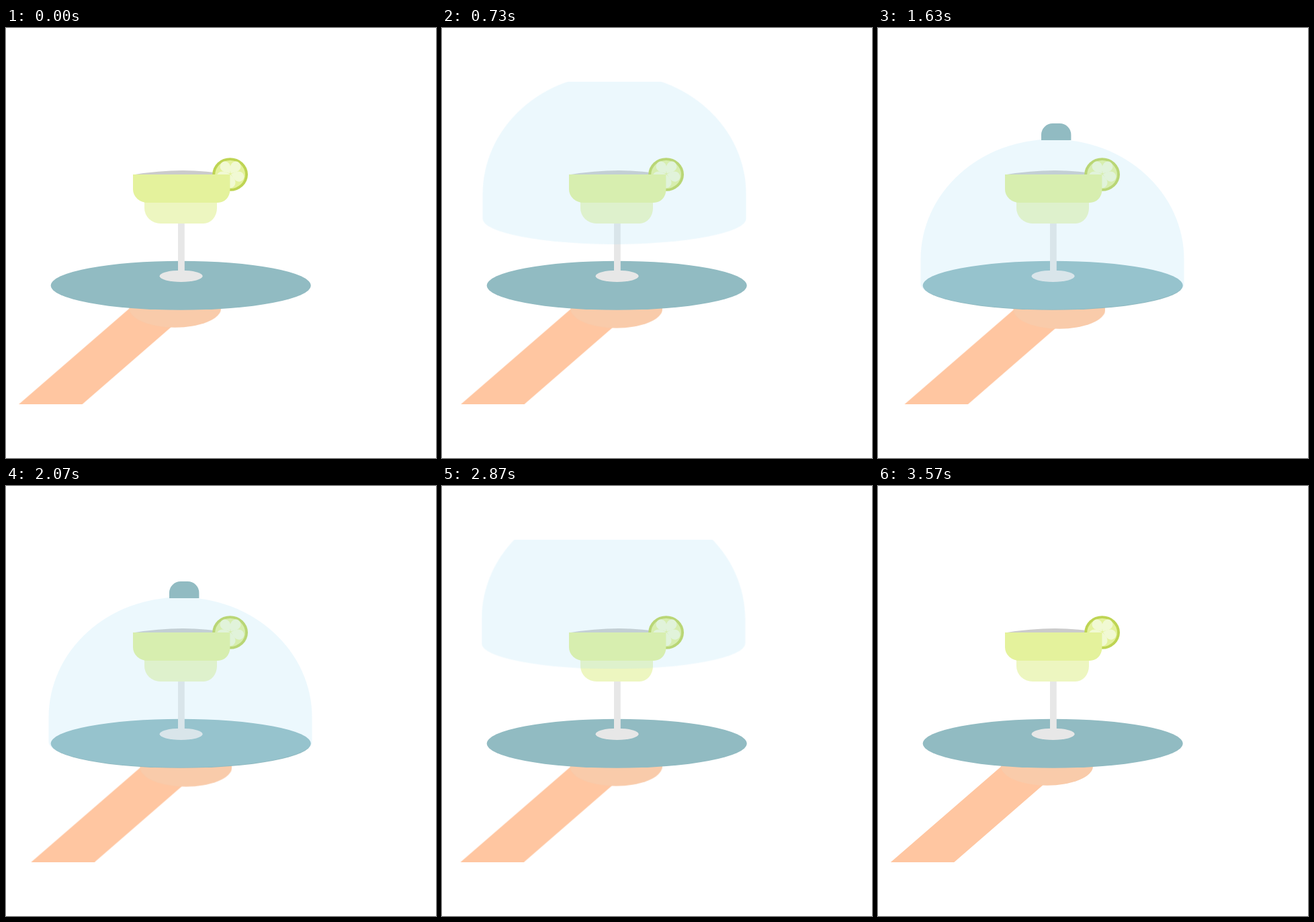
These frames come from a looping animation (640 by 640 pixels, 3610 ms). An HTML page without scripts:

```html
<!DOCTYPE html>
<html lang="en">
<head>
<meta charset="utf-8">
<title>Cocktail service</title>
<style>
  html, body { margin: 0; width: 100%; height: 100%; overflow: hidden; background: #fff; }
  svg { display: block; width: 100vw; height: 100vh; }

  .arm { animation: sway 3610ms linear infinite; }
  .cover { animation: cover 3610ms cubic-bezier(.333, 0, .667, 1) infinite; }

  @keyframes sway {
    0%, 98.6%, 100% { transform: translate(0, 0); }
    48.6% { transform: translate(19.8px, 2.1px); }
  }
  @keyframes cover {
    0%, 100% { transform: translate(-11.7px, -389px); }
    30.06%, 64.88% { transform: translate(0, 0); }
  }
</style>
</head>
<body>
<svg viewBox="0 0 640 640">
  <defs>
    <clipPath id="scene"><rect y="80.3" width="640" height="479.2"/></clipPath>
    <path id="segment" d="M1 0C6 -5 9 -7.5 13.5 -7.5a7.5 7.5 0 0 1 0 15C9 7.5 6 5 1 0z"/>
  </defs>

  <g clip-path="url(#scene)">
    <g class="arm">
      <path fill="#ffc6a1" d="M1.5 575H96L294 403H200z"/>
      <ellipse fill="#f9cbaa" cx="251.5" cy="417" rx="68.5" ry="28.8"/>
    </g>

    <ellipse fill="#91bbc2" cx="260.2" cy="383.3" rx="193.5" ry="36.5"/>

    <g class="glass">
      <path fill="#e7e7e7" d="M256 290h9.8v76H256z"/>
      <ellipse fill="#e7e7e7" cx="260.6" cy="369.3" rx="32" ry="8.6"/>
      <path fill="#cbcbcb" d="M189 218.5Q265 205.5 333 218.5z"/>

      <g class="lime">
        <ellipse fill="#bed453" cx="333.6" cy="218" rx="26.4" ry="24.8"/>
        <ellipse fill="#e4f29c" cx="333.6" cy="218" rx="22.4" ry="21"/>
        <g fill="#f1f9d3" transform="translate(334 217)">
          <use href="#segment" transform="rotate(-126)"/>
          <use href="#segment" transform="rotate(-54)"/>
          <use href="#segment" transform="rotate(18)"/>
          <use href="#segment" transform="rotate(90)"/>
          <use href="#segment" transform="rotate(162)"/>
        </g>
      </g>

      <path fill="#edf6c0" d="M206 259h108v9a20 23 0 0 1 -20 23h-64a24 23 0 0 1 -24 -23z"/>
      <path fill="#e4f29c" d="M189 218h144.4v23a18 19 0 0 1 -18 19H211a22 20 0 0 1 -22 -20z"/>
    </g>

    <g class="cover">
      <path fill="#a9dff6" fill-opacity=".22"
            d="M63.5 344a196 178.5 0 0 1 392 0v37a196 38 0 0 1 -392 0z"/>
      <path fill="#91bbc2" d="M243 167v-8a17 17 0 0 1 17 -17h10.4a17 17 0 0 1 17 17v8z"/>
    </g>
  </g>
</svg>
</body>
</html>
```
